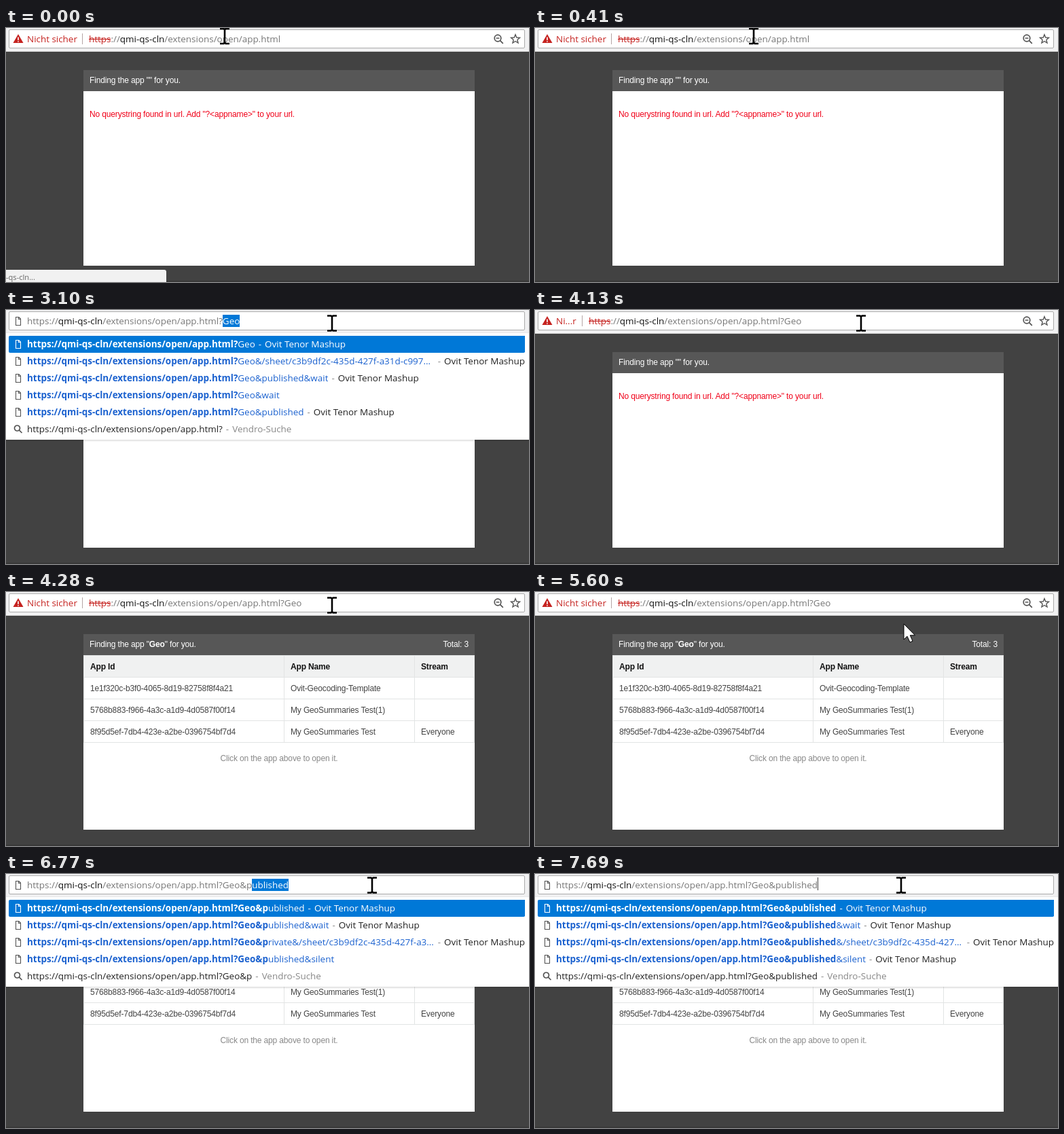
Write an HTML page that moves like this. It is 770 px wide and 374 px high and loops after 8000 ms.

```html
<!DOCTYPE html>
<html lang="de">
<head>
<meta charset="utf-8">
<title>App finder</title>
<style>
html, body { margin: 0; width: 100%; height: 100%; overflow: hidden; background: #424242; }
#stage { position: absolute; left: 0; top: 0; width: 770px; height: 374px; overflow: hidden;
  background: #424242; font: 13.45px "Open Sans", sans-serif; white-space: pre; }
#stage div { position: absolute; box-sizing: border-box; }
svg { position: absolute; left: 0; top: 0; overflow: visible; }

.page { left: 114px; top: 62px; width: 576px; height: 288px; background: #fff; color: #444;
  font: 12px/32px "Liberation Sans", Arial, sans-serif; letter-spacing: -.15px; }
.title { left: 0; top: 0; width: 576px; height: 31px; line-height: 31px; padding: 0 9px; background: #575757; color: #fff; }
.total { right: 9px; top: 0; }
.error { left: 9px; top: 49px; color: #f00018; }
.hint { left: 0; top: 167px; width: 576px; text-align: center; color: #888; }
.cell { height: 33px; padding-left: 9px; border: 1px solid #e2e4e4; }
.head { background: #f0f1f1; color: #111; font-weight: bold; }
.edge { left: 0; top: 372px; width: 770px; height: 2px; background: #393939; }
.status { left: 0; top: 356px; width: 236px; height: 19px; border-radius: 0 3px 0 0; background: #f1f1f1;
  color: #666; font-size: 11.1px; line-height: 21px; }

.toolbar { left: 0; top: 0; width: 770px; height: 35px; background: #f1f1f2; border-bottom: 1px solid #d4d4d4; }
.field { left: 4px; top: 2px; width: 760px; height: 28px; background: #fff; border: 1px solid #aaa; border-radius: 2px; }
.url { top: 2px; line-height: 28px; color: #777; }
.host { color: #111; }
.warn, s { color: #c5221f; }
.sep { top: 8px; width: 1px; height: 16px; background: #b5a5a5; }
.sel, .sel * { background: #0078d7; color: #fff; }
.caret { display: inline-block; width: 1px; height: 19px; margin-right: -1px; vertical-align: -3px; background: #444; }

.menu { left: 0; top: 34px; width: 770px; background: #fff; box-shadow: 0 1px 3px rgba(0,0,0,.2); }
.row { left: 4px; width: 760px; height: 25px; line-height: 24px; border-radius: 2px; color: #222; }
.row.active, .row.active * { background: #0078d7; color: #fff; }
.row.active svg { background: none; }
.line { left: 27px; width: 733px; display: flex; }
.link { overflow: hidden; text-overflow: ellipsis; color: #1c62cf; }
.dash { flex: none; color: #888; padding: 0 5px; }
.name { flex: none; }
.engine { color: #888; }
</style>
</head>
<body>
<div id="stage"></div>
<script>
const LOOP = 8000;
const BASE = 'https://qmi-qs-cln/extensions/open/app.html';
const SITE = 'Ovit Tenor Mashup';
const SHEET = '&/sheet/c3b9df2c-435d-427f-a31d-c9970b52e1d4';
const stage = document.getElementById('stage');

// Each list holds [start time, value...]; a value lasts until the next start.
const TYPED = [[0, ''], [3100, '?'], [3580, '?G'], [3820, '?Ge'], [3890, '?Geo'],
  [6770, '?Geo&p'], [6860, '?Geo&pu'],
  ...[1, 2, 3, 4, 5, 6].map(n => [7016 + 74 * n, '?Geo&pu' + 'blishe'.slice(0, n)]),
  [7690, '?Geo&published']];
const POINTER = [[0, 322, 12], [1200, 352, 13], [1273, 425, 15], [1346, 525, 17], [1419, 615, 19],
  [1492, 658, 19.5], [1565, 590, 19.5], [1638, 505, 19.5], [1710, 480, 19.5],
  [5600, 543, 47], [5750, 548, 42], [5831, 555, 35], [5913, 563, 24], [5994, 567, 18],
  [6076, 555, 17], [6157, 545, 16.5], [6239, 539, 16.5]];
const STATUS = [[0, 1], [230, .66], [320, .33], [410, 0]];

const at = (list, t) => list.findLast(entry => entry[0] <= t).slice(1);
const within = (t, from, to) => t >= from && t < to;
const esc = s => s.replace(/&/g, '&amp;').replace(/</g, '&lt;');
const box = (cls, html, style = '') => `<div class="${cls}" style="${style}">${html}</div>`;
const span = (cls, html) => `<span class="${cls}">${html}</span>`;
const svg = (x, y, body) => `<svg width="1" height="1" fill="none"><g transform="translate(${x} ${y})">${body}</g></svg>`;

const sheetIcon = (x, y, color) =>
  svg(x, y, `<path d="M1.5.5H6L8.5 3V12.5h-7zM5.5 1v2.5h3" stroke="${color}" stroke-width="1.1"/>`);
const lens = (x, y, r, inner = '') => svg(x, y,
  `<g stroke="#555" stroke-width="1.7"><circle r="${r}"/><path d="M${r * .7} ${r * .7}L${r + 3} ${r + 3}${inner}"/></g>`);
const warning = svg(18, 16,
  '<path d="M0-7L7.5 6h-15z" fill="#c5221f"/><path d="M0-2.5V2M0 3.2v1.6" stroke="#fff" stroke-width="1.6"/>');
const starPoints = Array.from({ length: 10 }, (_, i) => {
  const a = i * Math.PI / 5, r = i % 2 ? 3 : 6.8;
  return `${(r * Math.sin(a)).toFixed(2)},${(-r * Math.cos(a)).toFixed(2)}`;
}).join(' ');
const star = svg(750, 16.5, `<polygon points="${starPoints}" stroke="#555" stroke-width="1.4"/>`);

function pointer(t) {
  const [x, y] = at(POINTER, t);
  return y < 32
    ? svg(x, y, '<path d="M-7-11h5.5L0-9.5 1.5-11H7M-7 11h5.5L0 9.5 1.5 11H7M0-10V10" stroke="#000" stroke-width="2.6"/>')
    : svg(x, y, '<path d="M0 0V23L5 18.2 9 27 13 25.2 9.3 16.8H16.5Z" fill="#fff" stroke="#000"/>');
}

function table() {
  const columns = [[0, 296], [295, 193], [487, 89]];
  const rows = [
    ['App Id', 'App Name', 'Stream'],
    ['1e1f320c-b3f0-4065-8d19-82758f8f4a21', 'Ovit-Geocoding-Template', ''],
    ['5768b883-f966-4a3c-a1d9-4d0587f00f14', 'My GeoSummaries Test(1)', ''],
    ['8f95d5ef-7db4-423e-a2be-0396754bf7d4', 'My GeoSummaries Test', 'Everyone']];
  return rows.map((row, r) => row.map((text, c) => box(r ? 'cell' : 'cell head', text,
    `left:${columns[c][0]}px;width:${columns[c][1]}px;top:${31 + 32 * r}px`)).join('')).join('')
    + box('hint', 'Click on the app above to open it.');
}

function page(t) {
  const query = t < 4210 ? '' : '<b>Geo</b>';
  const listed = t >= 4280;
  const title = `Finding the app "${query}" for you.` + (listed ? box('total', 'Total: 3') : '');
  const body = listed ? table()
    : query ? '' : box('error', esc('No querystring found in url. Add "?<appname>" to your url.'));
  return box('page', box('title', title) + body) + box('edge', '');
}

function addressBar(t, typed, rest, open) {
  const editing = open || within(t, 3960, 4130);
  const [, scheme, host, path] = BASE.match(/^(https):\/\/([^/]+)(.*)$/);
  const tail = '://' + span('host', host) + path + esc(typed);
  const caret = open ? !rest
    : within(t, 1710, 2260) || within(t, 2410, 2640) || within(t, 6320, 6770);
  const end = (rest && span('sel', esc(rest))) + (caret ? span('caret', '') : '');
  const frame = box('toolbar', '') + box('field', '');
  if (editing) return frame + sheetIcon(13, 10, '#555') + box('url', scheme + tail + end, 'left:31px');

  const short = within(t, 4130, 4210);
  const sepX = short ? 69 : 112;
  const url = `<s>${scheme}</s>${tail}`;
  return frame + warning + box('url warn', short ? 'Ni...r' : 'Nicht sicher', 'left:31px')
    + box('sep', '', `left:${sepX}px`)
    + box('url', (within(t, 6157, 6320) ? span('sel', url) : url) + end, `left:${sepX + 10}px`)
    + lens(724, 15, 4.8, 'M-2.4 0H2.4') + star;
}

function suggestions(typed) {
  if (!typed.includes('&')) return [['?Geo', true], ['?Geo' + SHEET, true], ['?Geo&published&wait', true],
    ['?Geo&wait', false], ['?Geo&published', true]];
  const full = '?Geo&published', early = typed.endsWith('&p');
  return [[full, true], [full + '&wait', true], [(early ? '?Geo&private' : full) + SHEET, true],
    [full + '&silent', !early]];
}

function menu(typed) {
  const dash = span('dash', '-');
  const items = suggestions(typed);
  const row = (i, icon, html) => box(i ? 'row' : 'row active', icon + box('line', html), `top:${4 + 25 * i}px`);
  const links = items.map(([query, named], i) => row(i, sheetIcon(9, 6, i ? '#555' : '#fff'),
    span('link', `<b>${esc(BASE + typed)}</b>${esc(query.slice(typed.length))}`)
    + (named ? dash + span('name', SITE) : '')));
  const search = row(items.length, lens(12.5, 11, 4),
    span('name', esc(BASE + typed)) + dash + span('name engine', 'Vendro-Suche'));
  return box('menu', links.join('') + search, `height:${32 + 25 * items.length}px`);
}

function scene(t) {
  const [typed] = at(TYPED, t);
  const open = within(t, 3100, 3960) || t >= 6770;
  const rest = open ? (t < 6770 ? '?Geo' : '?Geo&published').slice(typed.length) : '';
  const [status] = at(STATUS, t);
  return page(t)
    + (status ? box('status', '-qs-cln...', `opacity:${status}`) : '')
    + addressBar(t, typed, rest, open)
    + (open ? menu(typed) : '')
    + pointer(t);
}

let shown = '';
function draw(now) {
  const html = scene(now % LOOP);
  if (html !== shown) stage.innerHTML = shown = html;
  requestAnimationFrame(draw);
}
draw(0);
</script>
</body>
</html>
```
